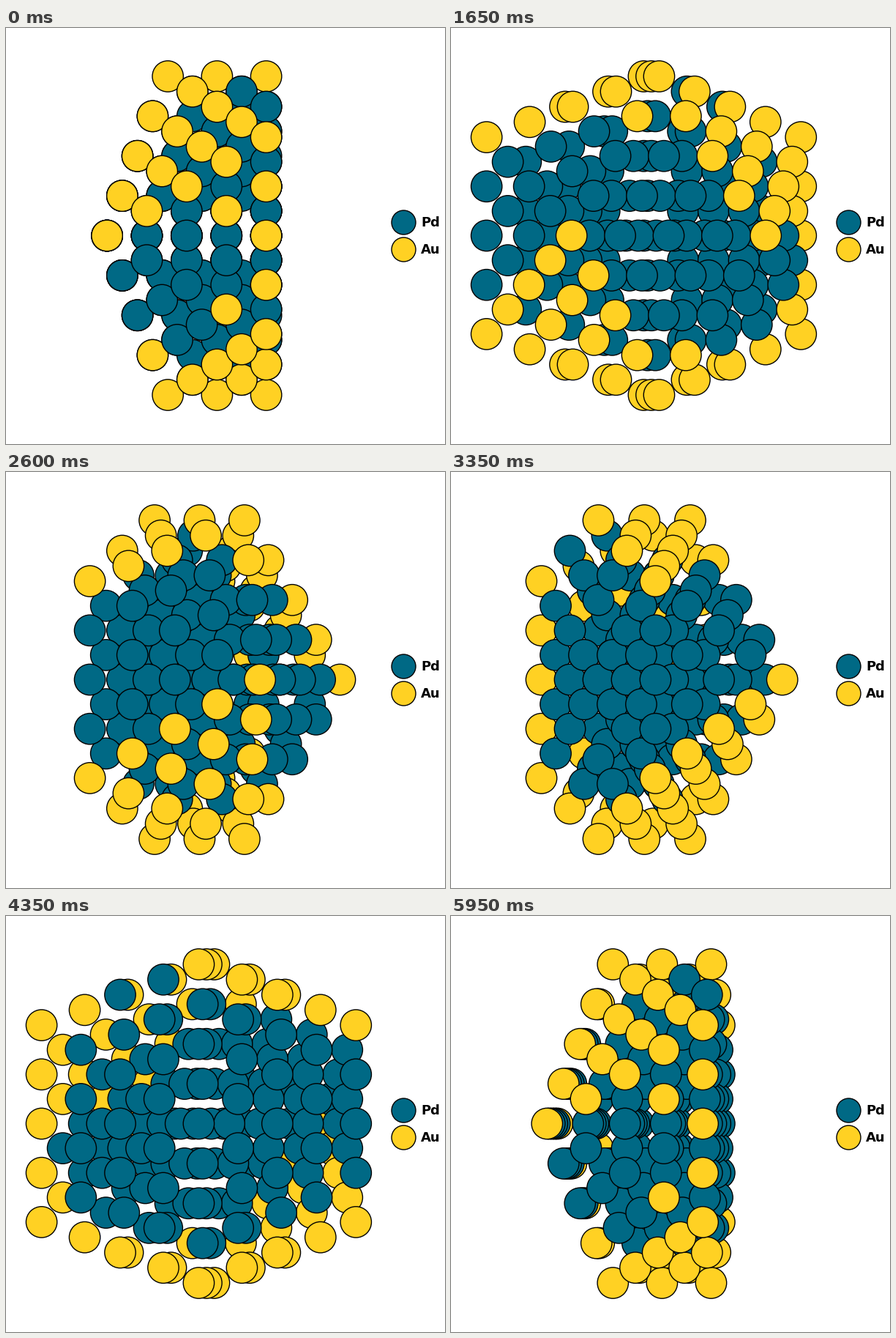
Animation of 600 by 568 pixels, one loop 6000 ms. Source, as a matplotlib script:

```python
from itertools import combinations

import matplotlib.pyplot as plt
import numpy as np
from matplotlib.animation import FuncAnimation

W, H, DPI = 600, 568, 100
FRAMES, INTERVAL = 120, 50
SHELLS = 4
UNIT = 33.606             # half the atom spacing on a shell, in px
CENTER = (275.9, 283.5)
PD, AU = "#006985", "#FFD123"
PT = 72 / DPI             # points per pixel

PHI = (1 + 5 ** 0.5) / 2
VERTS = {
    "T": (-1, PHI, 0), "U": (1, PHI, 0), "B": (-1, -PHI, 0), "V": (1, -PHI, 0),
    "F": (0, 1, PHI), "f": (0, -1, PHI), "K": (0, 1, -PHI), "k": (0, -1, -PHI),
    "L": (-PHI, 0, 1), "l": (-PHI, 0, -1), "R": (PHI, 0, 1), "r": (PHI, 0, -1),
}
VERTS = {name: np.array(v, float) for name, v in VERTS.items()}

# Outer-shell sites held by Pd; each is the sum of the four vertices named.
PD_SITES = """
TTUF TUFF LFff LLFf LLff LLLf BBLL BLLL BBfL BffL BfLL
LLLl LLll Llll TLLl TLll Tlll TTLl TTll BLLl BLll BBLl
lllK llKK lKKK TTlK TlKK TllK KKKk KKkk Kkkk lKKk lKkk llKk
""".split()


def key(p):
    return tuple(int(round(c * 1000)) for c in p)


def half_icosahedron():
    """Concentric icosahedral shells, keeping the half with x <= 0."""
    faces = [f for f in combinations(VERTS.values(), 3)
             if all(abs(np.linalg.norm(a - b) - 2) < 0.01
                    for a, b in combinations(f, 2))]
    pd_keys = {key(sum(VERTS[c] for c in site)) for site in PD_SITES}
    atoms = {key((0, 0, 0)): (np.zeros(3), PD)}
    for n in range(1, SHELLS + 1):
        for a, b, c in faces:
            for i in range(n + 1):
                for j in range(n + 1 - i):
                    p = i * a + j * b + (n - i - j) * c
                    if p[0] < 0.01:
                        outer = n == SHELLS and key(p) not in pd_keys
                        atoms[key(p)] = (p, AU if outer else PD)
    pos, colors = zip(*atoms.values())
    return np.array(pos) * UNIT, np.array(colors)


pos, colors = half_icosahedron()
pos[:, 0] -= pos[:, 0].mean()

fig = plt.figure(figsize=(W / DPI, H / DPI), dpi=DPI, facecolor="white")
ax = fig.add_axes([0, 0, 1, 1])
ax.set_xlim(0, W)
ax.set_ylim(H, 0)
ax.axis("off")


def balls(x, y, radius, color):
    return ax.scatter(x, y, s=(2 * radius * PT) ** 2, c=color,
                      edgecolors="black", linewidths=1)


cluster = balls(pos[:, 0], pos[:, 1], 21.2, colors)

for label, color, y in (("Pd", PD, 264.5), ("Au", AU, 301.5)):
    balls([542.5], [y], 16.5, [color])
    ax.text(567, y + 6.5, label, family="DejaVu Sans", weight="bold",
            size=13, ha="left", va="baseline")


def update(frame):
    t = 2 * np.pi * frame / FRAMES
    x, y, z = pos.T
    sx = CENTER[0] + x * np.cos(t) + z * np.sin(t)
    depth = z * np.cos(t) - x * np.sin(t)
    order = np.argsort(depth, kind="stable")
    cluster.set_offsets(np.column_stack([sx, CENTER[1] - y])[order])
    cluster.set_facecolors(colors[order])
    return (cluster,)


anim = FuncAnimation(fig, update, frames=FRAMES, interval=INTERVAL,
                     repeat=True, repeat_delay=0)
plt.show()
```
